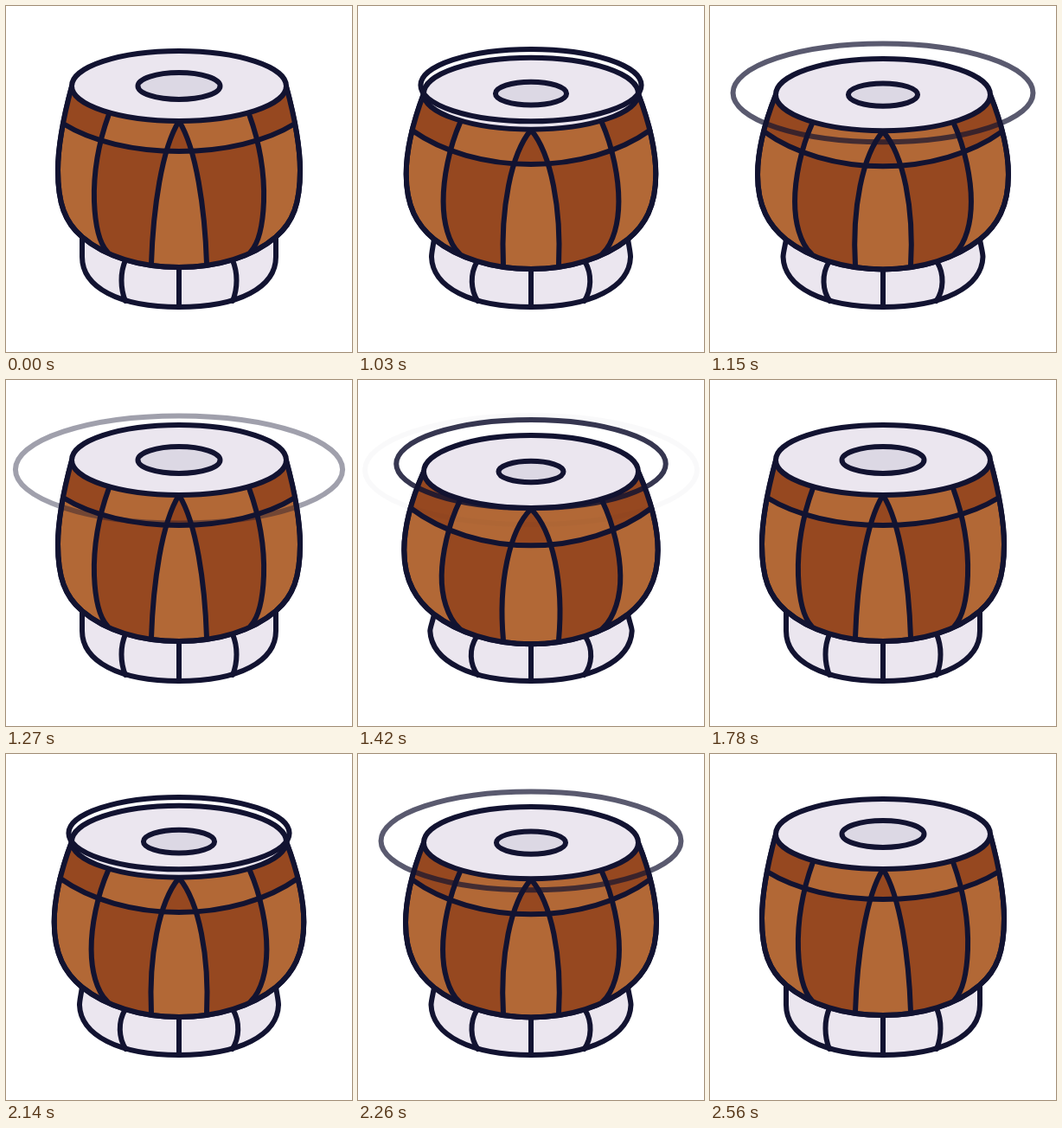
Write an HTML page without scripts that moves like this. It is 400 px wide and 400 px high and loops after 2590 ms.

```html
<!DOCTYPE html>
<html lang="en">
<head>
<meta charset="utf-8">
<title>Drum</title>
<style>
  html, body { margin: 0; width: 100%; height: 100%; overflow: hidden; background: #fff; }
  svg { display: block; width: 100%; height: 100%; }

  path, ellipse {
    fill: none;
    stroke: #121331;
    stroke-width: 6;
    stroke-linecap: round;
    stroke-linejoin: round;
  }
  path { d: var(--rest); animation: squash 2590ms infinite; }

  /* Each part has a resting shape and a fully struck shape. */
  .base {
    --rest: path("M88 266C88 275 88 282 88 290C88 325 130 348 200 348C270 348 312 325 312 290C312 282 312 275 312 266");
    --hit: path("M88 271C86 280 83.5 286 83.3 290C85 325 130 348 200 348C270 348 315 325 316.7 290C316.5 286 314 280 312 271");
  }
  .base-rib {
    --rest: path("M138 294C132 308 132 326 138 341");
    --hit: path("M137 297C128 311 129 329 138.5 341");
  }
  .base-mid {
    --rest: path("M200 302L200 348");
    --hit: path("M200 305L200 348");
  }
  .body {
    --rest: path("M76 93C66 130 60 160 60 190C60 228 68 250 88 267C115 290 155 302 200 302C245 302 285 290 312 267C332 250 340 228 340 190C340 160 334 130 324 93");
    --hit: path("M76 106C60.7 140.7 53.3 173 53.3 196.7C53.3 233.3 68 255 88 271C115 291.5 155 305.3 200 305.3C245 305.3 285 291.5 312 271C332 255 346.7 233.3 346.7 196.7C346.7 173 339.3 140.7 324 106");
  }
  .panels {
    --rest: path("M66 136C100 157 148 168 200 168L200 110L76 93ZM119 125C107 158 101 195 102 226C103 252 107 273 117 286Q142 297 168 299C170 235 180 165 200 133L200 110L119 102Z");
    --hit: path("M60.7 148C97.3 175.7 148 191.3 200 191.3L200 125L76 106ZM117.7 139.7C104.3 167.3 97 201.7 96.7 226C96.3 249.3 103 274.3 117 288Q142 299 168 302C162 235 174.7 174.3 200 149L200 125L117.7 115Z");
  }
  .outer-rib {
    --rest: path("M119 125C107 158 101 195 102 226C103 252 107 273 117 284");
    --hit: path("M117.7 139.7C104.3 167.3 97 201.7 96.7 226C96.3 249.3 103 274.3 117 287");
  }
  .inner-rib {
    --rest: path("M200 133C180 165 170 235 168 298");
    --hit: path("M200 149C174.7 174.3 162 235 168 300.7");
  }
  .band {
    --rest: path("M66 136C100 157 148 168 200 168C252 168 300 157 334 136");
    --hit: path("M60.7 148C97.3 175.7 148 191.3 200 191.3C252 191.3 302.7 175.7 339.3 148");
  }
  .skin {
    --rest: path("M76 92.5A124 40.5 0 1 1 324 92.5A124 40.5 0 1 1 76 92.5Z");
    --hit: path("M76 106A124 42 0 1 1 324 106A124 42 0 1 1 76 106Z");
  }
  .spot {
    --rest: path("M152.5 92.5A47.5 15.5 0 1 1 247.5 92.5A47.5 15.5 0 1 1 152.5 92.5Z");
    --hit: path("M162.5 106A37.5 12.3 0 1 1 237.5 106A37.5 12.3 0 1 1 162.5 106Z");
  }

  .pale { fill: #ebe6ef; }
  .grey { fill: #dcd8e4; }
  .wood { fill: #b26836; }
  .panels { fill: #964820; fill-rule: evenodd; stroke: none; }

  .wave {
    opacity: 0;
    animation: grow 2590ms var(--at) infinite, fade 2590ms linear var(--at) infinite;
  }

  /* Strikes at 1030, 1360 and 2140 ms: an abrupt dent, then a soft recovery. */
  @keyframes squash {
    0%, 100% { d: var(--rest); }
    39.76%, 52.5%, 82.62% {
      d: var(--rest);
      animation-timing-function: linear(.63, .93, 1);
    }
    42.08%, 54.83%, 84.94% {
      d: var(--hit);
      animation-timing-function: cubic-bezier(.37, 0, .63, 1);
    }
    49.03%, 61.77%, 91.89% { d: var(--rest); }
  }
  @keyframes grow {
    0% {
      cy: 91.5px; rx: 127px; ry: 41.5px;
      animation-timing-function: cubic-bezier(.28, 1, .6, 1);
    }
    15.44%, 100% { cy: 104px; rx: 192px; ry: 63px; }
  }
  @keyframes fade {
    0% { opacity: 1; }
    15.44%, 100% { opacity: 0; }
  }
</style>
</head>
<body>
<svg viewBox="0 0 400 400">
  <path class="base pale"/>
  <path class="base-mid"/>
  <path class="base-rib"/>
  <path class="base-rib" transform="matrix(-1 0 0 1 400 0)"/>

  <path class="body wood"/>
  <g>
    <path class="panels"/>
    <path class="outer-rib"/>
    <path class="inner-rib"/>
  </g>
  <g transform="matrix(-1 0 0 1 400 0)">
    <path class="panels"/>
    <path class="outer-rib"/>
    <path class="inner-rib"/>
  </g>
  <path class="band"/>
  <path class="body"/>

  <path class="skin pale"/>
  <path class="spot grey"/>

  <ellipse class="wave" cx="200" style="--at: 1030ms"/>
  <ellipse class="wave" cx="200" style="--at: 1360ms"/>
  <ellipse class="wave" cx="200" style="--at: 2140ms"/>
</svg>
</body>
</html>
```
